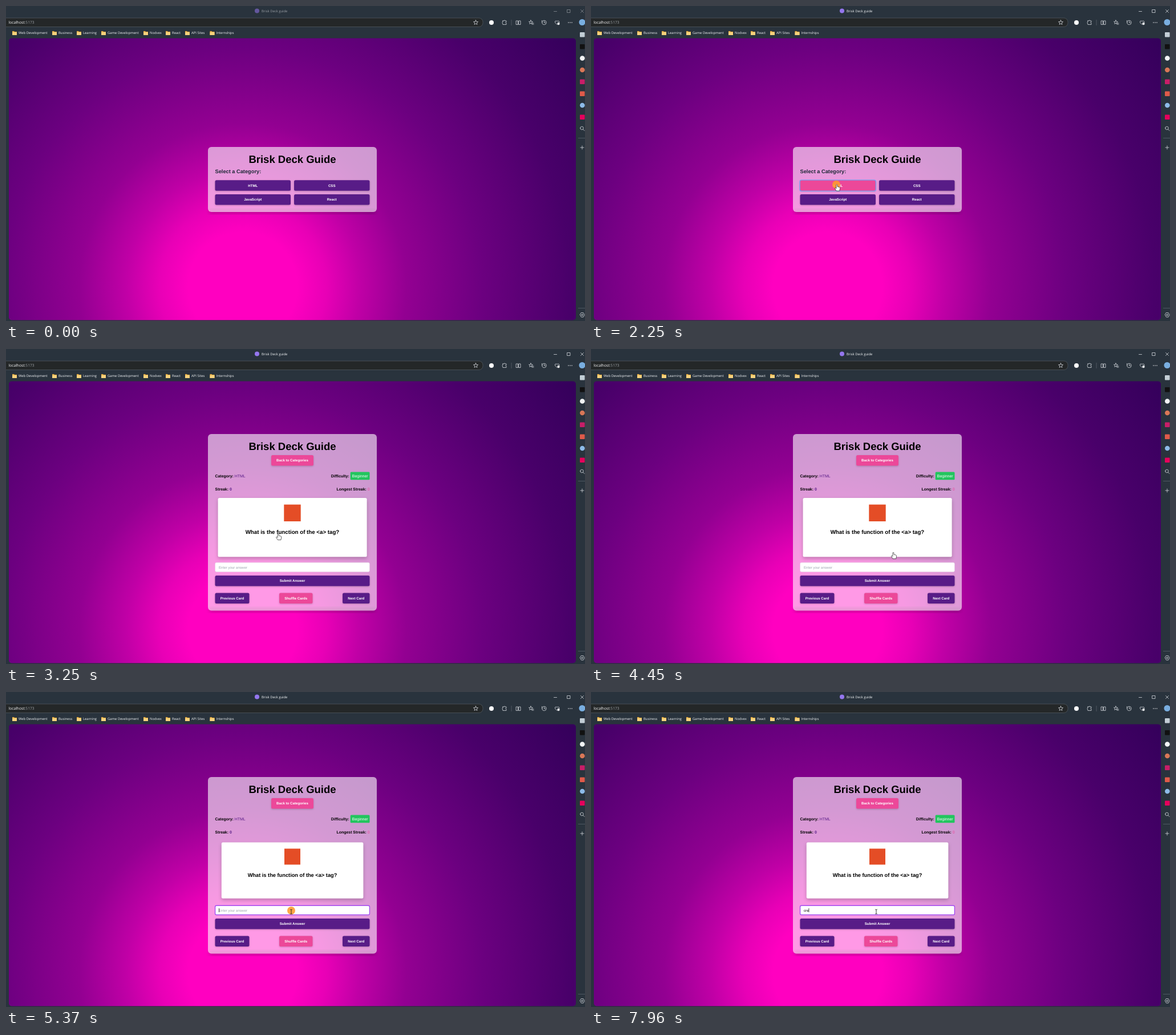
Write an HTML page that moves like this. It is 1015x552 px and loops after 8000 ms.

```html
<!DOCTYPE html>
<html lang="en">
<head>
<meta charset="utf-8">
<title>Flash cards</title>
<style>
  html, body { margin: 0; width: 100%; height: 100%; overflow: hidden; background: #29333d; }
  svg { display: block; width: 100vw; height: 100vh; }
  text { font-family: "Liberation Sans", Arial, sans-serif; text-rendering: geometricPrecision; white-space: pre; }
  .ui { font-family: "Open Sans", "Noto Sans", sans-serif; }
  .icon { fill: none; stroke: #d5d9dd; stroke-width: .8; stroke-linecap: round; stroke-linejoin: round; }
  .raised { filter: drop-shadow(0 1.5px 1.5px rgba(0,0,0,.2)); }
  .panel { fill: #fff; fill-opacity: .6; }
</style>
</head>
<body>
<svg viewBox="0 0 1015 552" preserveAspectRatio="none">
  <defs>
    <radialGradient id="glow" gradientUnits="userSpaceOnUse" cx="415" cy="492" r="735">
      <stop offset="0" stop-color="#ff00c0"/>
      <stop offset=".13" stop-color="#ff00c0"/>
      <stop offset=".2" stop-color="#e800b6"/>
      <stop offset=".28" stop-color="#c000a6"/>
      <stop offset=".39" stop-color="#930092"/>
      <stop offset=".57" stop-color="#6c0080"/>
      <stop offset=".78" stop-color="#49006a"/>
      <stop offset="1" stop-color="#33005a"/>
    </radialGradient>
    <filter id="soft" x="-10%" y="-10%" width="120%" height="125%"><feGaussianBlur stdDeviation="3"/></filter>
  </defs>
  <rect width="1015" height="552" fill="#29333d"/>
  <g id="chrome"></g>
  <rect x="5" y="56.5" width="994" height="494" rx="5" fill="url(#glow)"/>
  <g id="menu"></g>
  <g id="quiz"></g>
  <circle id="click" r="7" fill="#ff9a2e" fill-opacity=".88"/>
  <g id="pointer" stroke="#222" stroke-width=".7" stroke-linejoin="round" fill="#fff">
    <path id="arrow" d="M0 0V10.5L2.5 8.2L4.2 12L5.8 11.3L4.2 7.6H7.5Z"/>
    <path id="hand" d="M-1 1Q0 -1 1 1V4L4.6 5Q6 5.5 5.6 7L4.8 11.5H-.8L-3.4 7.6Q-3.8 6 -2.5 6.2L-1 7.3Z"/>
    <path id="beam" fill="none" stroke-width=".9" d="M-1.8 -4Q0 -4 0 -3Q0 -4 1.8 -4M0 -3V3M-1.8 4Q0 4 0 3Q0 4 1.8 4"/>
  </g>
</svg>
<script>
const $ = id => document.getElementById(id);
const PURPLE = '#581c87', PINK = '#ec4899';
const TITLE = 'Brisk Deck Guide';
const REM = 6.17;

const rect = (x, y, w, h, fill, rx = 0, extra = '') =>
  `<rect x="${x}" y="${y}" width="${w}" height="${h}" rx="${rx}" fill="${fill}" ${extra}/>`;
const circle = (x, y, r, fill) => `<circle cx="${x}" cy="${y}" r="${r}" fill="${fill}"/>`;
const icon = d => `<path class="icon" d="${d}"/>`;
const text = (x, y, size, str, fill = '#000', extra = '') =>
  `<text x="${x}" y="${y}" font-size="${size}" fill="${fill}" ${extra}>${str}</text>`;
const ui = (x, y, size, str, fill = '#f0f2f4', extra = '') => text(x, y, size, str, fill, `class="ui" ${extra}`);
const bold = (x, y, rem, str, fill, anchor = 'start') =>
  text(x, y, rem * REM, str, fill, `font-weight="700" text-anchor="${anchor}"`);
const button = (x, y, w, label, fill = PURPLE, id = '') =>
  rect(x, y, w, 18.5, fill, 2.5, `class="raised" ${id && `id="${id}"`}`) +
  bold(x + w / 2, y + 11.4, 1, label, '#fff', 'middle');
const panel = (y, h) =>
  `<path d="M340 ${y - 20}H664V${y + h + 24}H340Z M360 ${y}H644Q650 ${y} 650 ${y + 6}V${y + h - 6}Q650 ${y + h} 644 ${y + h}H360Q354 ${y + h} 354 ${y + h - 6}V${y + 6}Q354 ${y} 360 ${y}Z" fill="none"/>` +
  rect(356, y + h - 6, 292, 9, '#000', 5, 'opacity=".2" filter="url(#soft)"') +
  rect(354, y, 296, h, '#fff', 6, 'class="panel"');
const star = (x, y, r) => 'M' + Array.from({length: 10}, (_, i) => {
  const a = i * Math.PI / 5, k = i % 2 ? r * .45 : r;
  return `${x + k * Math.sin(a)} ${y - k * Math.cos(a)}`;
}).join('L') + 'Z';
const ring = (x, y, r) => `M${x - r} ${y}a${r} ${r} 0 1 1 ${2 * r} 0a${r} ${r} 0 1 1 ${-2 * r} 0Z`;

function buildChrome() {
  const bookmarks = [[11, 'Web Development'], [81, 'Business'], [124, 'Learning'], [167, 'Game Development'],
    [241, 'Nodvex'], [280, 'React'], [314, 'API Sites'], [357.5, 'Internships']];
  const folder = x => `<path d="M${x} 44h3l1 1h4v6h-8Z" fill="#e5ad45"/>` + rect(x, 46, 8, 5, '#f8d27c', .6);
  const tiles = [[50, '#c3ced6'], [71, '#111'], [132.5, '#c81e68'], [153.5, '#e05a4a'], [194.5, '#e6005c']];
  const dots = [[91.5, '#f2f4f5'], [112, '#d97757'], [174, '#8dbbe8']];
  $('chrome').innerHTML =
    `<g id="titlebar">${circle(440, 8.5, 4, '#9476ee')}${ui(448, 10.8, 5.9, TITLE.replace('G', 'g'))}
      ${icon('M960.5 9.5h5M984 6.5h5v5h-5ZM1007.5 6.5l5 5m0-5l-5 5')}</g>` +
    rect(-10, 21, 846, 15.5, '#242728', 7, 'stroke="#50575d" stroke-width=".8"') +
    ui(4.5, 31.2, 6.7, 'localhost<tspan fill="#9ea3a8">:5173</tspan>', '#fff') +
    icon(star(823.5, 29, 4.2)) + circle(851, 29, 4, '#fff') +
    icon('M871 26h2q1-2.5 2 0h2v2q-2.5 1 0 2v2.5h-6q-2-3 0-6.5Z') +
    '<path d="M886 24v10" stroke="#5b646d" stroke-width=".8"/>' +
    icon('M894.5 26h3v6.5h-3ZM899 26h3v6.5h-3Z') +
    icon(star(920, 28.5, 3.6)) + icon('M922.5 30h2.5M922 32h3') +
    icon(ring(943.5, 29, 3.7) + 'M943.5 26.7v2.5h2M939.5 25.5v2') +
    icon('M966 32.5l-3.5-3.5q-.8-3 2-3l1.5 1 1.5-1q3 0 2.5 3') + circle(968.5, 31, 2.2, '#e8ebed') +
    [986, 989, 992].map(x => circle(x, 29, .8, '#e4e7e9')).join('') +
    circle(1010, 28.5, 5.5, '#79aee0') +
    bookmarks.map(([x, s]) => folder(x) + ui(x + 11, 49.4, 5.9, s)).join('') +
    tiles.map(([y, c]) => rect(1006, y - 4, 8.5, 8.5, c, 1)).join('') +
    dots.map(([y, c]) => circle(1010.3, y, 4.3, c)).join('') +
    icon(ring(1009.5, 214, 2.8) + 'M1011.5 216l2.5 2.5') +
    '<path d="M1003 231.5h12M1003 529.5h12" stroke="#59636d" stroke-width=".8"/>' +
    icon('M1007 248h6M1010 245v6') +
    icon(ring(1010.3, 541.3, 1.4) + 'M1008.5 537.5h3.6l2 3.8-2 3.8h-3.6l-2.2-3.8Z');
}

function buildMenu() {
  $('menu').innerHTML = panel(247, 114) +
    bold(502, 274.6, 3, TITLE, '#000', 'middle') +
    bold(366.5, 293, 1.5, 'Select a Category:', '#1f2937') +
    button(366.5, 305.3, 132.5, 'HTML', PURPLE, 'choice') + button(505, 305.3, 132.5, 'CSS') +
    button(366.5, 330, 132.5, 'JavaScript') + button(505, 330, 132.5, 'React') +
    rect(366.1, 305, 133.2, 19.2, 'none', 2.8, 'id="choiceRing" stroke="#60a5fa" stroke-width="1.1"');
}

function buildQuiz() {
  $('quiz').innerHTML = panel(149, 309.5) +
    bold(502, 177, 3, TITLE, '#000', 'middle') +
    button(465, 186, 74, 'Back to Categories', PINK) +
    bold(366.5, 224.6, 1.125, `Category: <tspan fill="${PURPLE}" font-weight="400">HTML</tspan>`) +
    bold(569.7, 224.6, 1.125, 'Difficulty:') +
    rect(603.7, 215.5, 33.8, 13.8, '#22c55e', 1.5) + text(606.8, 224.6, 1.125 * REM, 'Beginner', '#fff') +
    bold(366.5, 247.8, 1.125, `Streak: <tspan fill="${PURPLE}">0</tspan>`) +
    bold(637.7, 247.8, 1.125, `Longest Streak: <tspan fill="${PINK}" font-weight="400">0</tspan>`, '#000', 'end') +
    '<g id="card">' +
      rect(377.8, 263.4, 248.6, 98.4, '#fff', 2.5, 'style="filter:drop-shadow(0 3px 3px rgba(0,0,0,.22))"') +
      rect(488, 274.5, 28, 28, '#e44d26') +
      bold(502, 323.9, 1.5, 'What is the function of the &lt;a&gt; tag?', '#000', 'middle') +
    '</g>' +
    rect(366.6, 374.2, 270.8, 16.3, '#fff', 2.3, 'id="field" stroke="#d8d3dc" stroke-width=".4"') +
    text(373, 384.5, REM, '', '#000', 'id="answer"') +
    rect(373, 379, .7, 7, '#000', 0, 'id="caret"') +
    button(366.5, 396.9, 271, 'Submit Answer') +
    button(366.5, 427.6, 60, 'Previous Card') +
    button(479, 427.6, 58.5, 'Shuffle Cards', PINK) +
    button(590, 427.6, 47.5, 'Next Card');
}

// time, x, y of the pointer's hot spot
const route = [
  [790, 850, 248], [1300, 560, 262], [1450, 455, 280], [1590, 436, 302], [1650, 434, 307], [1790, 431, 312.5],
  [3200, 431, 312.5], [3250, 477, 323], [3450, 515, 331], [3720, 537, 337],
  [4330, 537, 337], [4450, 530, 356], [4590, 518, 371], [4770, 508, 381], [4970, 500, 385]
];
const clamp = v => Math.max(0, Math.min(1, v));
const ease = v => { v = clamp(v); return v * v * (3 - 2 * v); };
const between = (t, a, b) => t >= a && t < b;
const show = (id, on) => $(id).style.display = on ? '' : 'none';

function pointerAt(t) {
  const i = route.findIndex(k => k[0] > t);
  if (i < 0) return route.at(-1).slice(1);
  if (i === 0) return route[0].slice(1);
  const [t0, x0, y0] = route[i - 1], [t1, x1, y1] = route[i];
  const p = (t - t0) / (t1 - t0);
  return [x0 + (x1 - x0) * p, y0 + (y1 - y0) * p];
}

function mix(a, b, p) {
  const channel = (c, i) => parseInt(c.slice(i, i + 2), 16);
  return `rgb(${[1, 3, 5].map(i => Math.round(channel(a, i) + (channel(b, i) - channel(a, i)) * p))})`;
}

function drawPointer(t) {
  const [x, y] = pointerAt(t);
  const kind = between(t, 1650, 4480) ? 'hand' : t >= 4640 ? 'beam' : 'arrow';
  for (const id of ['arrow', 'hand', 'beam']) show(id, id === kind);
  show('pointer', t >= 790);
  $('pointer').setAttribute('transform', `translate(${x} ${y})`);
  show('click', between(t, 2250, 2390) || between(t, 5370, 5500));
  $('click').setAttribute('transform', t < 3000 ? 'translate(430 313)' : 'translate(500 383)');
}

function drawField(t) {
  const focused = t >= 5370;
  $('field').setAttribute('stroke', focused ? '#a34df0' : '#d8d3dc');
  $('field').setAttribute('stroke-width', focused ? 1.4 : .4);
  const typed = t >= 7960 ? 'cre' : t >= 6960 ? 'cr' : t >= 6500 ? 'c' : '';
  $('answer').textContent = typed || 'Enter your answer';
  $('answer').setAttribute('fill', typed ? '#000' : '#9ca3af');
  const widths = {'': 0, c: .5, cr: .833, cre: 1.389};
  $('caret').setAttribute('x', 373 + widths[typed] * REM);
  show('caret', focused && !between(t, 5900, 6430) && !between(t, 7490, 7960));
}

function draw(t) {
  $('titlebar').setAttribute('opacity', t < 2250 ? .55 : 1);
  show('menu', t < 2390);
  show('quiz', t >= 2390);
  $('choice').setAttribute('fill', mix(PURPLE, PINK, ease((t - 1600) / 190)));
  show('choiceRing', t >= 2250);
  const scale = 1 + .05 * (ease((t - 2390) / 260) - ease((t - 4450) / 270));
  $('card').setAttribute('transform', `translate(502 312.6) scale(${scale}) translate(-502 -312.6)`);
  drawField(t);
  drawPointer(t);
}

buildChrome();
buildMenu();
buildQuiz();
const start = performance.now();
function frame() {
  draw((performance.now() - start) % 8000);
  requestAnimationFrame(frame);
}
frame();
</script>
</body>
</html>
```
